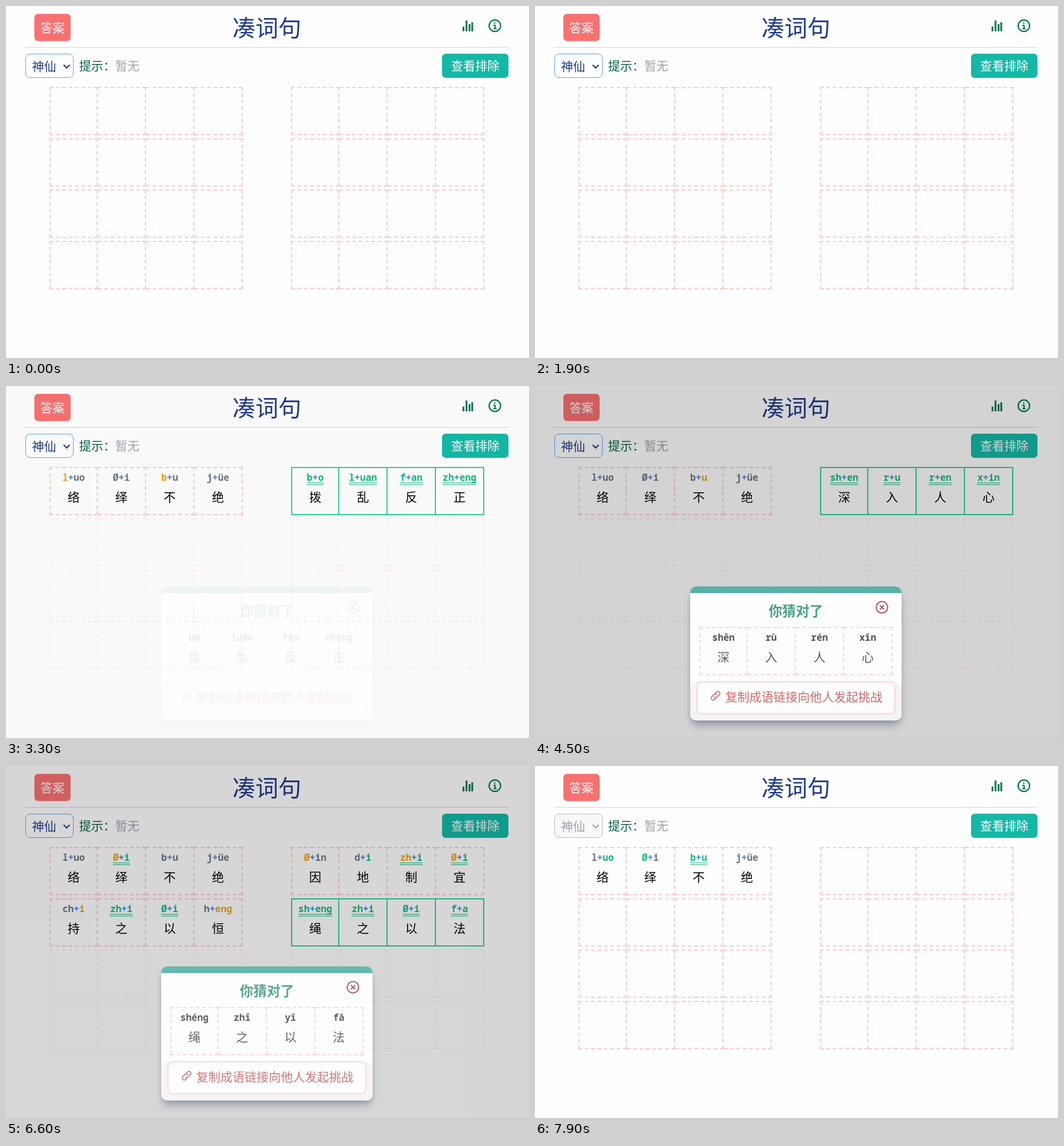
Recreate the animation shown at these times as an HTML page. Size 866 by 583 pixels, loop 8 s.

```html
<!DOCTYPE html>
<html lang="zh">
<head>
<meta charset="utf-8">
<title>凑词句</title>
<style>
html, body { margin: 0; width: 100%; height: 100%; overflow: hidden; background: #fff; }
body { font: 20px/28px "Noto Sans CJK SC", "Noto Sans CJK", sans-serif; }
#stage { position: relative; width: 866px; height: 583px; overflow: hidden; background: #fefefe; }
#stage div, #stage svg { position: absolute; box-sizing: border-box; }
.t { white-space: nowrap; }
.btn { border-radius: 6px; color: #fff; text-align: center; }
.row { display: flex; width: 320px; height: 80px; --edge: 2px dashed #fecaca; }
#stage .cell { position: relative; width: 80px; height: 80px; border: var(--edge); border-left-width: 0; flex: none; }
#stage .cell:first-child { border-left-width: 2px; }
.win { --edge: 2px solid #34d399; }
.off { opacity: .25; }
.py { left: 0; right: 0; top: 5px; text-align: center; white-space: nowrap;
  font: bold 15.5px/20px "Noto Sans Mono", "DejaVu Sans Mono", monospace; }
.py span { position: relative; display: inline-block; }
.line::after { content: ""; position: absolute; left: 0; right: 0; top: 19px; height: 4px;
  box-sizing: border-box; border: solid #10b981; border-width: 1px 0; }
.py i { font-style: normal; color: #6b7280; }
.py b { color: #3b82f6; }
.py i.o { color: #f59e0b; }
.py i.g { color: #10b981; }
.han { left: 0; right: 0; top: 34px; text-align: center; color: #000; }
#pick { left: 32px; top: 79px; width: 80px; height: 40px; border: 1px solid #60a5fa; border-radius: 8px; color: #1e3a8a; background: #fff; }
#pick.dim { border-color: #b8bcc4; color: #9ca3af; background: #f8f8f9; }
#veil { inset: 0; background: rgba(0,0,0,.2); opacity: 0; }
#card { left: 257px; top: 332px; width: 350px; height: 222px; border-radius: 10px; background: #fff;
  box-shadow: 0 10px 14px -3px rgba(50,60,95,.5), 0 3px 6px rgba(50,60,95,.15); }
#card .py { color: #333; }
#card .han { color: #3c3c3c; }
#card .row { --edge: 2px dashed #fecdcd; }
</style>
</head>
<body>
<div id="stage">
  <div class="btn t" style="left:47px;top:13px;width:60px;height:45px;background:#f87171;line-height:45px">答案</div>
  <div class="t" style="left:332px;width:200px;top:7px;text-align:center;font-size:38px;line-height:54px;color:#1e3a8a">凑词句</div>
  <svg style="left:750px;top:18px" width="80" height="30" fill="none" stroke="#047857">
    <path d="M7.5 24v-8M12.5 24V6M17.5 24V12M22 24V9" stroke-width="3"/>
    <circle cx="59.5" cy="14.7" r="9.5" stroke-width="2.2"/>
    <path d="M59.3 9v2.4M57 14h2.8v5.5M57 19.5h5.4" stroke-width="2"/>
  </svg>
  <div style="left:32px;top:68px;width:800px;height:1px;background:#d1d5db"></div>
  <div id="pick">
    <div class="t" style="left:10px;top:6px">神仙</div>
    <svg style="left:61px;top:16px" width="14" height="10" fill="none" stroke="currentColor" stroke-width="2"><path d="M1.5 1.5l5 5 5-5"/></svg>
  </div>
  <div class="t" style="left:121px;top:85px;color:#065f46">提示：</div>
  <div class="t" style="left:181px;top:85px;color:#9ca3af">暂无</div>
  <div class="btn t" style="left:722px;top:79px;width:110px;height:40px;background:#14b8a6;line-height:40px">查看排除</div>
  <div id="board" style="left:0;top:0"></div>
  <div id="veil">
    <div id="card">
      <div style="left:0;top:157px;width:350px;height:65px;border-radius:14px 14px 10px 10px;background:#f3f3f3"></div>
      <div style="left:0;top:0;width:350px;height:11px;border-radius:10px 10px 0 0;background:#3aa399"></div>
      <div class="t" style="left:0;width:350px;top:23px;text-align:center;font-size:22.5px;line-height:32px;font-weight:bold;color:#2c8c74">你猜对了</div>
      <svg style="left:305px;top:22px" width="26" height="26" fill="none" stroke="#994040" stroke-width="2">
        <circle cx="12.5" cy="12.5" r="9.5"/><path d="M9 9l7 7M16 9l-7 7"/>
      </svg>
      <div id="answer" style="left:15px;top:67px"></div>
      <div style="left:10px;top:157px;width:330px;height:55px;border:2px solid #fecfcf;border-radius:10px;background:#fff"></div>
      <svg style="left:33px;top:172px" width="18" height="18" fill="none" stroke="#c45050" stroke-width="1.7" stroke-linecap="round">
        <path d="M8 5.5l2.5-2.6a3.3 3.3 0 0 1 4.7 4.7L11.7 11a3.3 3.3 0 0 1-4.7 0M10 12.5l-2.5 2.6a3.3 3.3 0 0 1-4.7-4.7L6.3 7a3.3 3.3 0 0 1 4.7 0"/>
      </svg>
      <div class="t" style="left:58px;top:169px;color:#c45050">复制成语链接向他人发起挑战</div>
    </div>
  </div>
</div>
<script>
const $ = id => document.getElementById(id);
const FIRST = 'l+uo络 Ø+i绎 b+u不 j+üe绝';
const WIN = 'gg_ gg_ gg_ gg_';

// Marks per syllable: initial, final (o = elsewhere, g = right), _ = underlined
const rounds = [
  { from: 380, rise: 300, end: 1500, clear: 1900, tones: 'bù zhé bù kòu', guesses: [
    [FIRST, '.. .. gg_ ..'],
    ['c+eng层 ch+u出 b+u不 q+iong穷', '.. .o gg_ ..'],
    ['b+u不 zh+e折 b+u不 k+ou扣', WIN]] },
  { from: 2361, rise: 300, end: 3400, clear: 3800, tones: 'bō luàn fǎn zhèng', guesses: [
    [FIRST, 'o. .. o. ..'],
    ['b+o拨 l+uan乱 f+an反 zh+eng正', WIN]] },
  { from: 4289, rise: 320, end: 5300, clear: 5700, tones: 'shēn rù rén xīn', guesses: [
    [FIRST, '.. .. .o ..'],
    ['sh+en深 r+u入 r+en人 x+in心', WIN]] },
  { from: 6180, rise: 745, end: 7300, clear: 7400, tones: 'shéng zhī yǐ fǎ', guesses: [
    [FIRST, '.. og_ .. ..'],
    ['Ø+in因 d+i地 zh+i制 Ø+i宜', 'o. .g og_ og_'],
    ['ch+i持 zh+i之 Ø+i以 h+eng恒', '.o gg_ gg_ .o'],
    ['sh+eng绳 zh+i之 Ø+i以 f+a法', WIN]] },
  { from: 7900, clear: 8000, guesses: [[FIRST, '.g g. gg_ ..']] }
];

const cell = (py, han, line) =>
  `<div class="cell"><div class="py"><span class="${line ? 'line' : ''}">${py}</span></div><div class="han">${han}</div></div>`;

function syllable(text, mark) {
  const [head, rest] = text.split('+');
  const part = (s, m) => `<i class="${m === '.' ? '' : m}">${s}</i>`;
  return cell(part(head, mark[0]) + '<b>+</b>' + part(rest.slice(0, -1), mark[1]), rest.slice(-1), mark[2]);
}

function drawBoard(round) {
  const guesses = round ? round.guesses : [];
  const solved = guesses.some(g => g[1] === WIN);
  let html = '';
  for (let i = 0; i < 8; i++) {
    const g = guesses[i];
    const kind = g ? (g[1] === WIN ? 'win' : '') : (solved ? 'off' : '');
    const marks = g && g[1].split(' ');
    const cells = g ? g[0].split(' ').map((s, k) => syllable(s, marks[k])).join('') : cell('', '').repeat(4);
    html += `<div class="row ${kind}" style="left:${72 + i % 2 * 400}px;top:${134 + (i >> 1) * 85}px">${cells}</div>`;
  }
  $('board').innerHTML = html;
  $('pick').className = guesses.length && !solved ? 'dim' : '';
  if (solved) {
    const chars = guesses[guesses.length - 1][0].split(' ').map(s => s.slice(-1));
    $('answer').innerHTML = '<div class="row">' + round.tones.split(' ').map((s, k) => cell(s, chars[k])).join('') + '</div>';
  }
}

const clamp = x => Math.max(0, Math.min(1, x));

function fade(round, t) {
  if (!round || !round.end) return 0;
  const rise = 1 - (1 - clamp((t - round.from) / round.rise)) ** 2;
  const fall = clamp((round.end - t) / 300) ** 2.3;
  return .96 * Math.min(rise, fall);
}

let shown = null;
function tick() {
  const t = Math.floor(performance.now() % 8000 / 100) * 100;
  const round = rounds.find(r => t >= r.from && t < r.clear);
  if (round !== shown) drawBoard(shown = round);
  $('veil').style.opacity = fade(round, t);
  requestAnimationFrame(tick);
}
tick();
</script>
</body>
</html>
```
